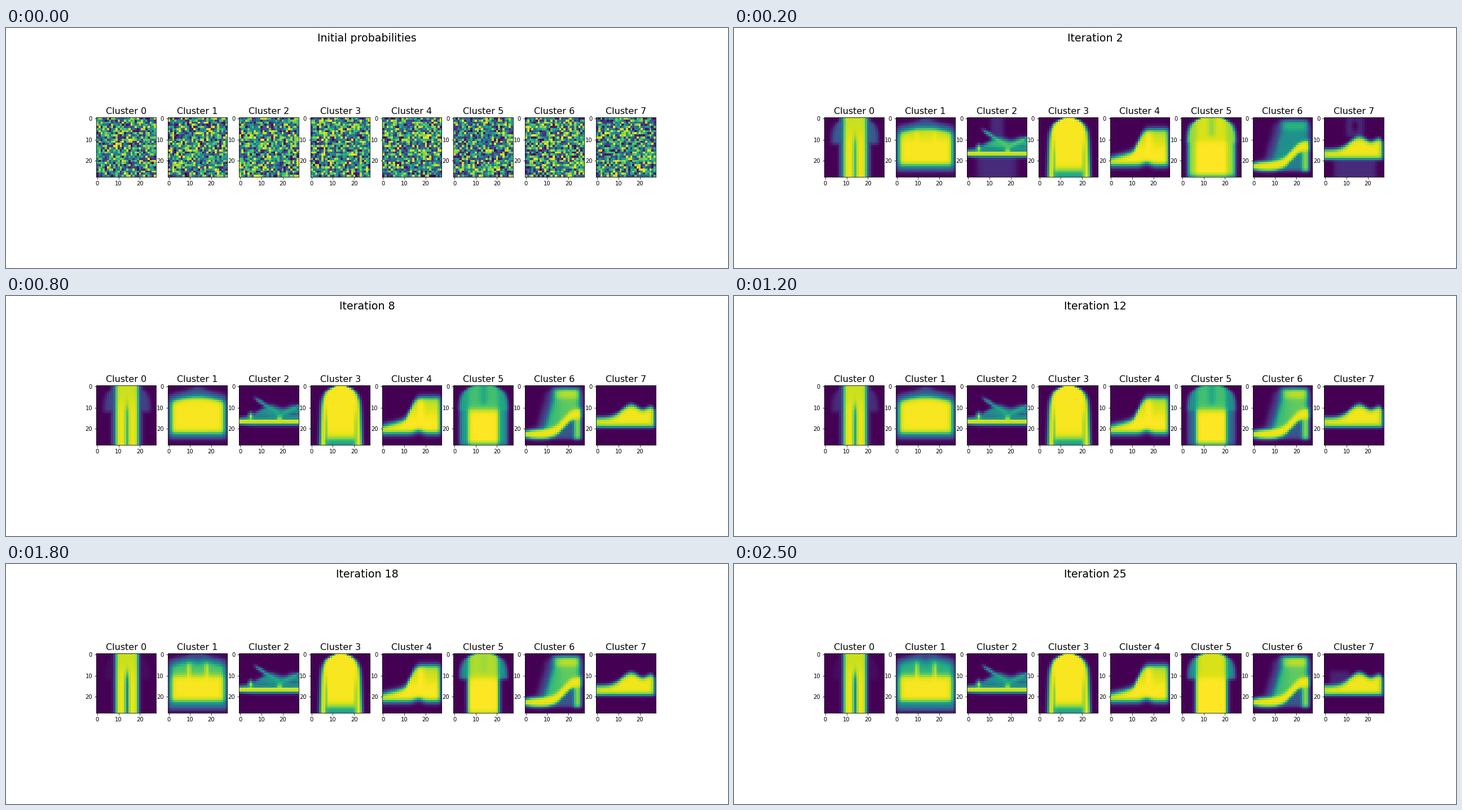
A matplotlib script that plays this animation: 1280x427 px, repeating every 2600 ms.

```python
import numpy as np
import matplotlib.pyplot as plt
from matplotlib.animation import FuncAnimation

N = 28
STEPS = 26
X, Y = np.meshgrid(np.arange(N) + 0.5, np.arange(N) + 0.5)


def below(v, limit, soft=0.5):
    """Soft step: 1 where v < limit, 0 beyond it."""
    return 1 / (1 + np.exp(np.clip((v - limit) / soft, -50, 50)))


def between(v, lo, hi, soft=0.5):
    return below(lo, v, soft) * below(v, hi, soft)


def bump(v, centre, width):
    return np.exp(-((v - centre) / width) ** 2)


def mix(img, value, mask):
    return img + (value - img) * mask


def ramp(t, start, end):
    return float(np.clip((t - start) / (end - start), 0, 1))


def ghost(t):
    return 0.12 * np.exp(-2 * (t - 2))


def shoulders(width, y=Y):
    """Half-width of a garment that widens below the neck."""
    return width - 7 * np.exp(-y / 2.6)


def trousers(t):
    d = abs(X - 14.4)
    fade = 1 - ramp(t, 2, 18)
    tee = np.maximum(below(d, shoulders(10.8), 0.6) * below(Y, 12.5),
                     below(d, 7.2, 0.4))
    img = (0.03 + 0.27 * fade) * tee
    img = mix(img, 0.97, below(d, 5.3, 0.4))
    gap = 0.28 + 0.22 * ramp(t, 8, 18)
    img -= gap * bump(d, 0, 0.9) * below(10, Y, 1.5)
    return img - 0.05 * below(Y, 8, 2) * below(d, 5)


def bag(t):
    d = abs(X - 14)
    low = 0.6 * bump(t, 4, 1.7) + ramp(t, 12, 20)
    top = 5.3 - 2.5 * low + 0.015 * d ** 2
    halo_top = 2.6 - 2 * low - 1.8 * bump(d, 0, 4) + 0.012 * d ** 2
    halo = between(Y, halo_top, 25.2 + 1.7 * low, 0.6) * below(d, 13.6, 0.4)
    img = (0.26 + 0.14 * low) * halo
    img = mix(img, 0.99, between(Y, top, 22.8, 0.65) * below(d, 12.6, 0.6))
    peaks = bump(d, 4.2, 0.9) * below(4.5, Y, 0.8)
    img *= 1 - 0.36 * low * below(Y, 10.3, 0.8) * (1 - 0.75 * peaks)
    return img * (1 - 0.3 * low * bump(d, 0, 2.5) * below(Y, 5, 0.8))


def sandal(t):
    fresh = np.exp(-(t - 2))
    top = 15.5 - 5.8 * bump(X, 15, 7.5) - 5 * bump(X, 26, 4.5)
    handle = below(abs(X - 14.2), 3) * below(Y, 9)
    img = ghost(t) * np.maximum(handle, between(X, 5, 23, 0.8) * below(18, Y))
    img = mix(img, 0.52 + 0.15 * fresh, between(Y, top, 17) * below(4.6, X, 0.3))
    strap = bump(Y - 0.65 * (X - 14), 10.3, 1) * between(X, 8, 21)
    buckle = bump(Y + 0.5 * (X - 19), 14.2, 0.9) * below(18.5, X)
    img = mix(img, 0.64 + 0.12 * fresh, 0.8 * np.maximum(strap, buckle))
    hole = bump(X, 11, 3.5) * bump(Y, 14.5, 0.9)
    wedge = bump(X, 26, 3) * bump(Y, 13.6, 0.9)
    img -= 0.16 * hole + 0.2 * wedge
    img = mix(img, 0.45, between(Y, 14.5, 19, 0.25) * below(abs(Y - 16.8), X / 4 + 1.8))
    img = mix(img, 0.9, bump(X, 5.5, 1) * bump(Y, 14.5, 1.6))
    img = mix(img, 0.9, bump(X, 19, 1.2) * bump(Y, 15.2, 0.9))
    return mix(img, 0.96, between(Y, 15.9, 17.9, 0.2))


def pullover(t):
    d = abs(X - 14.2)
    img = 0.99 * below(d, shoulders(9 + 0.03 * Y), 0.4)
    img *= 1 - 0.2 * bump(d, 6.9, 0.6) * below(14, Y, 2)
    return img * (1 - 0.45 * below(25.2, Y, 0.9) * below(d, 6.6, 0.4))


def boot(t):
    top = 5.5 + 9.5 * below(X, 13.3, 1.2) + 4 * np.clip(1 - X / 16, 0, 1)
    sole = 22.8 - 1.1 * bump(X, 17, 2.5)
    img = between(Y, top, sole, 0.65) * below(X, 27.2, 0.4)
    return img * (1 - 0.1 * below(Y, 12, 2) * (1 - bump(X, 18, 1.7)))


def coat(t):
    d = abs(X - 14.2)
    tee = ramp(t, 12, 20)
    opened = ramp(t, 2, 8) * (1 - tee)
    outline = below(d, shoulders(11), 0.5)
    img = 0.87 * (1 - ramp(t, 2, 18)) * outline
    sleeve = 0.5 + 0.35 * (1 - ramp(t, 2, 10))
    img = mix(img, sleeve, outline * below(Y, 12, 0.4))
    torso = below(d, 7, 0.5)
    chest = 0.94 - 0.24 * opened - 0.1 * (1 - tee) * bump(d, 0, 1.6) * below(Y, 9)
    img = mix(img, chest, torso * below(d, shoulders(10.5)))
    img = mix(img, 1, torso * below(11.3, Y, 0.8))
    return img * (1 - 0.25 * (1 - tee) * below(26.8, Y, 0.3))


def heel(t):
    settled = 1 - np.exp(-(t - 2) / 1.5)
    arch = 23 - 10.2 * below(18, X, 2.3)
    front = 13.2 - 0.3 * np.clip(Y - 7, 0, None)
    shaft = between(X, front, 25.6, 0.6) * between(Y, 1.4, arch)
    img = 0.2 * between(X, front - 3.5, 27, 0.8) * between(Y, 1 + 0.3 * abs(X - 19), arch, 0.8)
    img = mix(img, 0.5 + 0.18 * settled, shaft)
    img += 0.16 * shaft * between(Y, 1.8, 6, 0.7) * below(14, X)
    img += 0.08 * settled * shaft * below(16, X, 1.5)
    under = between(X, 13, 24) * between(Y, arch, 25)
    img = mix(img, 0.42 - 0.15 * settled, under)
    thick = 2.4 * (1 - np.exp(-(X + 2.5) / 3))
    img = mix(img, 0.82, between(X, 23, 26.3, 0.35) * between(Y, 13, 25.3, 0.4))
    return mix(img, 0.98, below(abs(Y - arch), thick, 0.45) * below(X, 26.3, 0.4))


def sneaker(t):
    top = 15 - 6 * bump(X, 16.5, 6) - 4.5 * bump(X, 26, 3.5)
    d = abs(X - 14.5)
    handle = below(d, 4) * below(Y, 9) * (1 - bump(d, 0, 1.5) * bump(Y, 4, 3))
    img = ghost(t) * np.maximum(handle, below(d, 9.7) * below(19.5, Y))
    img = np.maximum(img, 0.1 * ramp(t, 18, 25) * between(X, 3, 12) * between(Y, 8.5, 15))
    img = mix(img, 0.87, between(Y, top, 19.6, 0.4) * below(X, 27.4, 0.3))
    return mix(img, 0.98, between(Y, top + 1.8, 18, 0.4) * between(X, 1, 26))


CLUSTERS = [trousers, bag, sandal, pullover, boot, coat, heel, sneaker]


def build():
    rng = np.random.default_rng(7)
    noise = rng.random((len(CLUSTERS), N, N))
    later = [np.array([shape(t) for shape in CLUSTERS]) for t in range(2, STEPS)]
    # The first pass still mixes every cluster with the overall mean.
    first = mix(later[0], later[0].mean(axis=0), 0.35)
    first /= first.max(axis=(1, 2), keepdims=True)
    return [noise, first, *later]


steps = build()

plt.rcParams.update({"font.family": "DejaVu Sans", "font.size": 10})
# A hair over the pixel size keeps rounding from losing a row.
fig, axes = plt.subplots(1, 8, figsize=(1280.01 / 72, 427.01 / 72), dpi=72,
                         facecolor="white")
fig.subplots_adjust(left=.125, right=.9, bottom=.1265, top=.8815, wspace=.2)
heading = fig.suptitle("Initial probabilities", fontsize=19)

images = []
for i, ax in enumerate(axes):
    images.append(ax.imshow(steps[0][i], cmap="viridis", vmin=0, vmax=1,
                            interpolation="nearest"))
    ax.set_title(f"Cluster {i}", fontsize=16)
    ax.set_xticks([0, 10, 20])
    ax.set_yticks([0, 10, 20])


def draw(t):
    heading.set_text(f"Iteration {t}" if t else "Initial probabilities")
    for im, data in zip(images, steps[t]):
        im.set_data(data)
    return [heading, *images]


anim = FuncAnimation(fig, draw, frames=STEPS, interval=100, repeat=True,
                     repeat_delay=0, blit=False)
plt.show()
```
